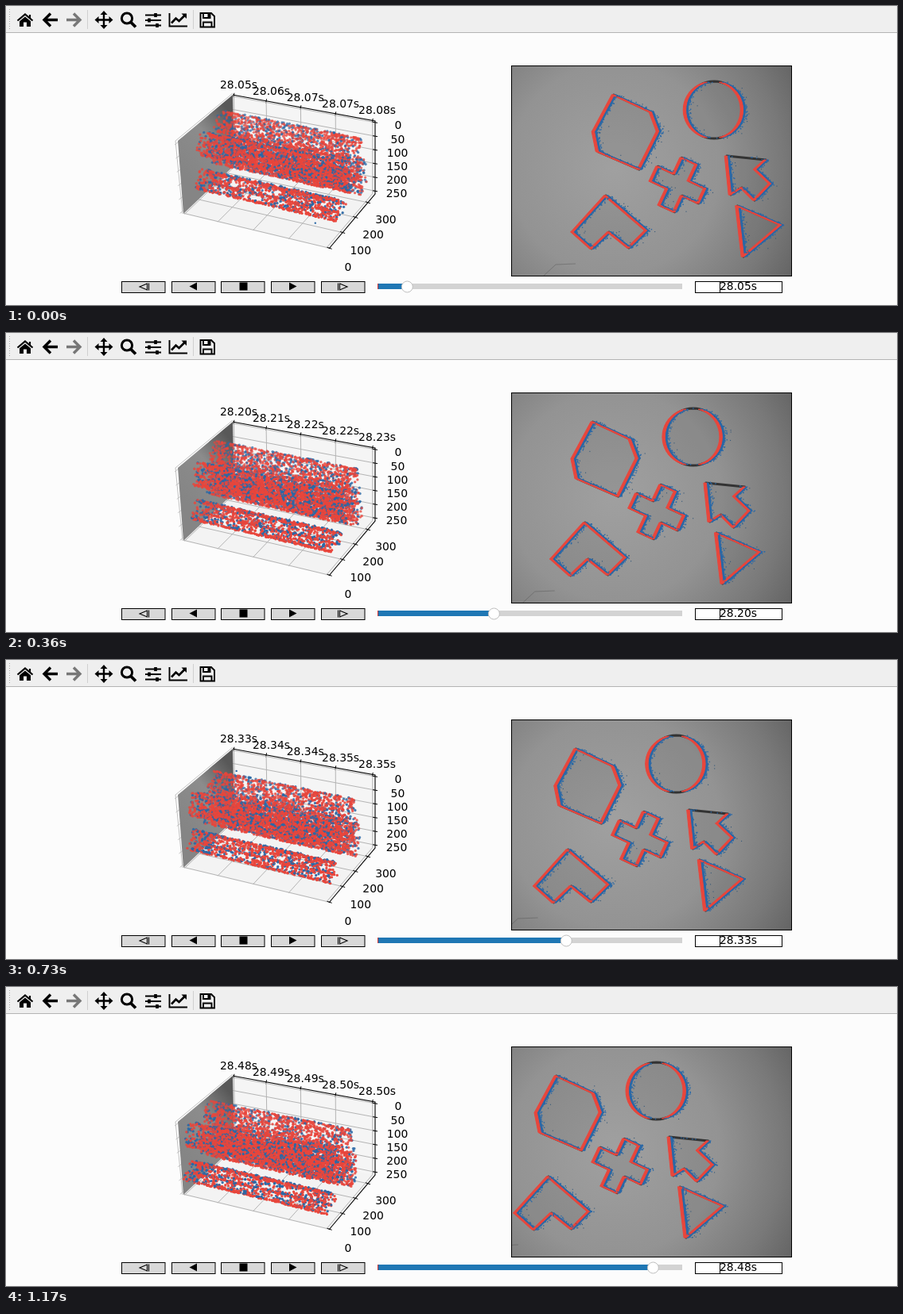
Recreate the animation shown at these times as an HTML page with a canvas. Size 1120 by 377 pixels, loop 1.19 s.

```html
<!DOCTYPE html>
<html lang="en">
<head>
<meta charset="utf-8">
<title>Event viewer</title>
<style>
  html, body { margin: 0; width: 100%; height: 100%; overflow: hidden; background: #fcfcfc; }
  svg, canvas { position: absolute; left: 0; top: 0; width: 1120px; height: 377px; }
  text { font: 13.89px "DejaVu Sans", sans-serif; text-anchor: middle; }
</style>
</head>
<body>
<svg viewBox="0 0 1120 377" width="1120" height="377">
  <defs>
    <radialGradient id="photo" gradientUnits="userSpaceOnUse" cx="765" cy="205" r="265">
      <stop offset="0" stop-color="#a0a0a0"/>
      <stop offset=".5" stop-color="#939393"/>
      <stop offset=".8" stop-color="#797979"/>
      <stop offset="1" stop-color="#626262"/>
    </radialGradient>
    <linearGradient id="wall" gradientUnits="userSpaceOnUse" x1="216" y1="200" x2="287" y2="140">
      <stop offset="0" stop-color="#858585"/>
      <stop offset=".55" stop-color="#8c8c8c"/>
      <stop offset="1" stop-color="#585858"/>
    </linearGradient>
  </defs>

  <rect width="1120" height="33" fill="#efefef"/>
  <path d="M0 33.5H1120" stroke="#b4b4b4"/>
  <path d="M4.5 4V31" stroke="#aaa" stroke-dasharray="1 2"/>
  <path d="M102.5 5V29M235.5 5V29" stroke="#d0d0d0"/>
  <g stroke="#000" fill="none">
    <path d="M14.5 18.5L24 10.5L33.5 18.5M30 11V15" stroke-width="2.2"/>
    <path d="M17 19.2L24 13.4L31 19.2V26H26V20.5H22V26H17Z" fill="#000" stroke="none"/>
    <path d="M56 9.5L48 17.5L56 25.5M48.5 17.5H65" stroke-width="3.4"/>
    <path d="M85 9.5L93 17.5L85 25.5M92.5 17.5H76" stroke-width="3.4" stroke="#777"/>
    <path d="M123 9V26M114 17.5H132" stroke-width="2.4"/>
    <path d="M123 6L127.5 11H118.5ZM123 29L127.5 24H118.5ZM111.5 17.5L116.5 13V22ZM134.5 17.5L129.5 13V22Z" fill="#000" stroke="none"/>
    <circle cx="152" cy="15.5" r="6.6" stroke-width="3"/>
    <path d="M157 20.5L163 26.5" stroke-width="3.8"/>
    <path d="M175 11.5H195M175 18H195M175 24.5H195" stroke-width="1.9"/>
    <path d="M188 9V14M180 15.5V20.5M190 22V27" stroke-width="3.6"/>
    <path d="M205.5 9V25.5H228" stroke-width="1.9"/>
    <path d="M208 21.5L213.5 15.5L217.5 19L225 11.5" stroke-width="2.6"/>
    <path d="M220.5 9.5H227V16Z" fill="#000" stroke="none"/>
    <path d="M244.5 9H258L262 13V26.5H244.5ZM248 9V15H256.5V9M248 26V20.5H258.5V26" stroke-width="1.9"/>
    <path d="M253.5 9H256.5V14.5H253.5Z" fill="#000" stroke="none"/>
  </g>

  <g id="axes"></g>

  <rect x="635.5" y="75.5" width="352" height="265" fill="url(#photo)" stroke="#000"/>

  <g id="buttons" fill="#d8d8d8" stroke="#000"></g>
  <path d="M177.5 350L168 354L177.5 358ZM179.5 349.5V358.5" fill="none" stroke="#000" stroke-width="1.1"/>
  <path d="M240 348.5V358.5L230.5 353.5ZM293.5 348.5H303.5V358.5H293.5ZM356 348.5V358.5L365.5 353.5Z"/>
  <path d="M419.5 350L429 354L419.5 358ZM417.5 349.5V358.5" fill="none" stroke="#000" stroke-width="1.1"/>

  <rect x="467" y="350" width="383" height="7" fill="#d3d3d3"/>
  <rect id="fill" x="467" y="350" height="7" fill="#1f77b4"/>
  <path d="M467.5 350V357" stroke="#c33"/>
  <circle id="knob" cy="354" r="7" fill="#fff" stroke="#bfbfbf"/>
  <rect x="866.5" y="347.5" width="109" height="14" fill="#fff" stroke="#000"/>
  <path d="M897.5 348V361" stroke="#000"/>
  <text id="clock" x="920.5" y="358"></text>
</svg>
<canvas id="events" width="1120" height="377"></canvas>
<script>
const NS = "http://www.w3.org/2000/svg";
const RED = "#e8463c", BLUE = "#2a68a6";
const LOOP = 1190;
const STARTS = [0, 20, 90, 150, 220, 290, 360, 430, 500, 580, 660, 730, 810, 880, 960, 1030, 1100, 1170];
const TICKS = [.008, .235, .477, .722, .982];
const PHOTO = { x: 635, y: 76, w: 352, h: 265 };
const byId = id => document.getElementById(id);
const ctx = byId("events").getContext("2d");

function add(parent, tag, attrs, text = "") {
  const el = document.createElementNS(NS, tag);
  for (const key in attrs) el.setAttribute(key, attrs[key]);
  el.textContent = text;
  return parent.appendChild(el);
}

const mix = (a, b, f) => a.map((v, k) => v + (b[k] - v) * f);

// Plot cube: u is image x (front to back), v image y (down), s time (left to right).
function project(u, v, s) {
  const left = mix(mix([216, 170], [285, 112], u), mix([223, 262], [287, 201], u), v);
  const right = mix(mix([403, 211], [464, 145], u), mix([406, 306], [464, 237], u), v);
  return mix(left, right, s);
}

const line = (...points) => "M" + points.map(p => project(...p).map(n => n.toFixed(1)).join(" ")).join("L");

function drawAxes() {
  const axes = byId("axes");
  const path = (d, attrs) => add(axes, "path", { d, fill: "none", ...attrs });
  const label = (x, y, text) => add(axes, "text", { x, y: Math.round(y) }, text);
  const tick = (p, dx, dy) => path(`M${p[0] - dx / 2} ${p[1] - dy / 2}l${dx} ${dy}`, { stroke: "#000" });

  path(line([1, 0, 0], [1, 0, 1], [1, 1, 1], [1, 1, 0]) + "Z", { fill: "#f5f5f5" });
  path(line([0, 1, 0], [1, 1, 0], [1, 1, 1], [0, 1, 1]) + "Z", { fill: "#f3f3f3" });
  const grid = { stroke: "#b4b4b4" };
  TICKS.forEach(s => {
    path(line([1, 0, s], [1, 1, s], [0, 1, s]), grid);
    tick(project(1, 0, s), 1, -5);
  });
  for (let k = 0; k < 6; k++) {
    const v = .02 + k * .188;
    path(line([0, v, 0], [1, v, 0], [1, v, 1]), grid);
    const [x, y] = project(0, v, 0);
    path(`M${x} ${y}l-4 3`, { stroke: "#c4c4c4" });
    tick(project(1, v, 1), 6, 1);
    label(492.8 - k * .35, 155 + k * 17.6 - k * k * .1, k * 50);
  }
  for (let k = 0; k < 4; k++) {
    const u = .01 + k * .29 - k * k * .004;
    path(line([u, 1, 0], [u, 1, 1]), grid);
    tick(project(u, 1, 1), 6, 2);
    label(430 + k * 15.8, 334 - k * 21.5 + k * k * .5, k * 100);
  }
  path(line([0, 0, 0], [1, 0, 0], [1, 1, 0], [0, 1, 0]) + "Z", { fill: "url(#wall)" });
  path("M285 110L213 170L222 262", { stroke: "#c2c2c2" });
  path(line([1, 0, 0], [1, 0, 1], [1, 1, 1], [0, 1, 1]), { stroke: "#000", "stroke-width": 1.1 });
  return TICKS.map((_, k) => label(292.5 + k * 40.2 + k * k * .83, 104 + k * 8.1, ""));
}

function circle(cx, cy, r) {
  return Array.from({ length: 48 }, (_, k) => {
    const a = k * Math.PI / 24;
    return [cx + r * Math.cos(a), cy + r * Math.sin(a)];
  });
}

function cross(cx, cy, reach, half, angle) {
  const points = [];
  for (let k = 0; k < 4; k++) {
    const c = Math.cos(angle + k * Math.PI / 2), s = Math.sin(angle + k * Math.PI / 2);
    for (const [a, b] of [[reach, -half], [reach, half], [half, half]])
      points.push([cx + a * c - b * s, cy + a * s + b * c]);
  }
  return points;
}

// Listed from the back of the plot to the front.
const shapes = [
  circle(890, 131, 36),
  [[919.5, 252], [974, 276], [927, 316]],
  [[906, 189], [955, 194], [942, 206], [961, 224], [941, 245], [925, 229], [911, 238]],
  cross(845, 225.5, 33, 10.3, 25 * Math.PI / 180),
  [[764, 112], [811, 134], [820, 158], [796, 206], [744, 183.5], [739, 158.5]],
  [[754, 239], [805, 283], [783, 305], [758, 285], [736, 306], [712.5, 285]]
];

const edgesOf = shape => shape.map((p, k) => [p, shape[(k + 1) % shape.length]]);

function randomizer(seed) {
  return () => {
    seed = (seed + 0x6D2B79F5) | 0;
    let t = Math.imul(seed ^ seed >>> 15, 1 | seed);
    t ^= t + Math.imul(t ^ t >>> 7, 61 | t);
    return ((t ^ t >>> 14) >>> 0) / 4294967296;
  };
}

// Only the vertical extent of an edge triggers events under sideways motion.
function scatter(shape, density, rand, visit) {
  for (const [a, b] of edgesOf(shape)) {
    const count = Math.abs(b[1] - a[1]) * density;
    const whole = Math.floor(count) + (rand() < count % 1 ? 1 : 0);
    for (let k = 0; k < whole; k++) visit(...mix(a, b, rand()));
  }
}

function dot(x, y, r, color) {
  ctx.fillStyle = color;
  ctx.beginPath();
  ctx.arc(x, y, r, 0, 7);
  ctx.fill();
}

// Band left behind by an outline moving sideways; nearly level edges leave none.
function sweep(shape, from, to, color) {
  ctx.fillStyle = ctx.strokeStyle = color;
  ctx.lineWidth = 1;
  ctx.lineJoin = "round";
  for (const [[ax, ay], [bx, by]] of edgesOf(shape)) {
    if (Math.abs(by - ay) < .2 * Math.abs(bx - ax)) continue;
    ctx.beginPath();
    ctx.moveTo(ax + from, ay);
    ctx.lineTo(ax + to, ay);
    ctx.lineTo(bx + to, by);
    ctx.lineTo(bx + from, by);
    ctx.closePath();
    ctx.fill();
    ctx.stroke();
  }
}

function drawPhoto(shift, rand) {
  ctx.save();
  ctx.beginPath();
  ctx.rect(PHOTO.x + 1, PHOTO.y, PHOTO.w - 1, PHOTO.h - 1);
  ctx.clip();
  ctx.translate(-shift, 0);
  ctx.lineWidth = 1;
  ctx.strokeStyle = "rgba(70,70,70,.35)";
  ctx.beginPath();
  ctx.moveTo(676, 340);
  ctx.lineTo(691, 326);
  ctx.lineTo(716, 325);
  ctx.stroke();
  for (const shape of shapes) {
    ctx.beginPath();
    shape.forEach(p => ctx.lineTo(...p));
    ctx.closePath();
    ctx.fillStyle = "rgba(60,60,60,.1)";
    ctx.fill();
    ctx.lineWidth = 3;
    ctx.strokeStyle = "#333";
    ctx.stroke();
    sweep(shape, .8, 3.4, BLUE);
    sweep(shape, -2.8, .6, RED);
    scatter(shape, .9, rand, (x, y) => {
      ctx.fillStyle = BLUE;
      ctx.fillRect(x + 2.5 + 4 * rand() ** 2, y - .7 + 2 * (rand() - .5), 1.4, 1.4);
    });
    scatter(shape, .07, rand, (x, y) => {
      ctx.fillStyle = "#345878";
      ctx.fillRect(x + 5 + 9 * rand(), y + 8 * (rand() - .5), 1.1, 1.1);
    });
  }
  ctx.restore();
}

function drawCloud(shift, rand) {
  const dots = [];
  for (const shape of shapes) {
    scatter(shape, 7.5, rand, (x, y) => {
      const s = .965 * rand();
      const red = rand() < .68;
      const px = x - shift - s * 4.3 + (red ? -1 : 2 + 2 * rand());
      const across = (px - PHOTO.x) / PHOTO.w;
      const u = 1.1 * across / (1 + .1 * across);
      const v = (y - PHOTO.y) / PHOTO.h;
      dots.push({ u, v, s, depth: u - .4 * s, color: red ? RED : BLUE });
    });
  }
  dots.sort((a, b) => b.depth - a.depth);
  for (const { u, v, s, depth, color } of dots) {
    ctx.globalAlpha = .97 - .4 * Math.max(0, depth);
    dot(...project(u, v, s), 1.65, color);
  }
  ctx.globalAlpha = 1;
  for (let k = 0; k < 3; k++) dot(...project(rand(), rand(), rand()), 1.2, BLUE);
}

const tickLabels = drawAxes();
for (let k = 0; k < 5; k++)
  add(byId("buttons"), "rect", { x: 145.5 + Math.round(k * 62.7), y: 347.5, width: 54.5, height: 14 });

function drawStep(step) {
  const time = 28.054 + step * .025;
  const shift = 4.45 * step - .012 * step * step;
  const knob = 504.3 + step * 18.18;
  const rand = randomizer(step * 977 + 5);
  byId("clock").textContent = time.toFixed(2) + "s";
  tickLabels.forEach((el, k) => el.textContent = (time + k * .00625).toFixed(2) + "s");
  byId("fill").setAttribute("width", knob - 467);
  byId("knob").setAttribute("cx", knob);
  ctx.clearRect(0, 0, 1120, 377);
  drawCloud(shift, rand);
  drawPhoto(shift, rand);
}

const begin = performance.now();
let shown = -1;
function update() {
  const now = (performance.now() - begin) % LOOP;
  const step = STARTS.filter(t => t <= now).length - 1;
  if (step !== shown) drawStep(shown = step);
  requestAnimationFrame(update);
}
update();
</script>
</body>
</html>
```
